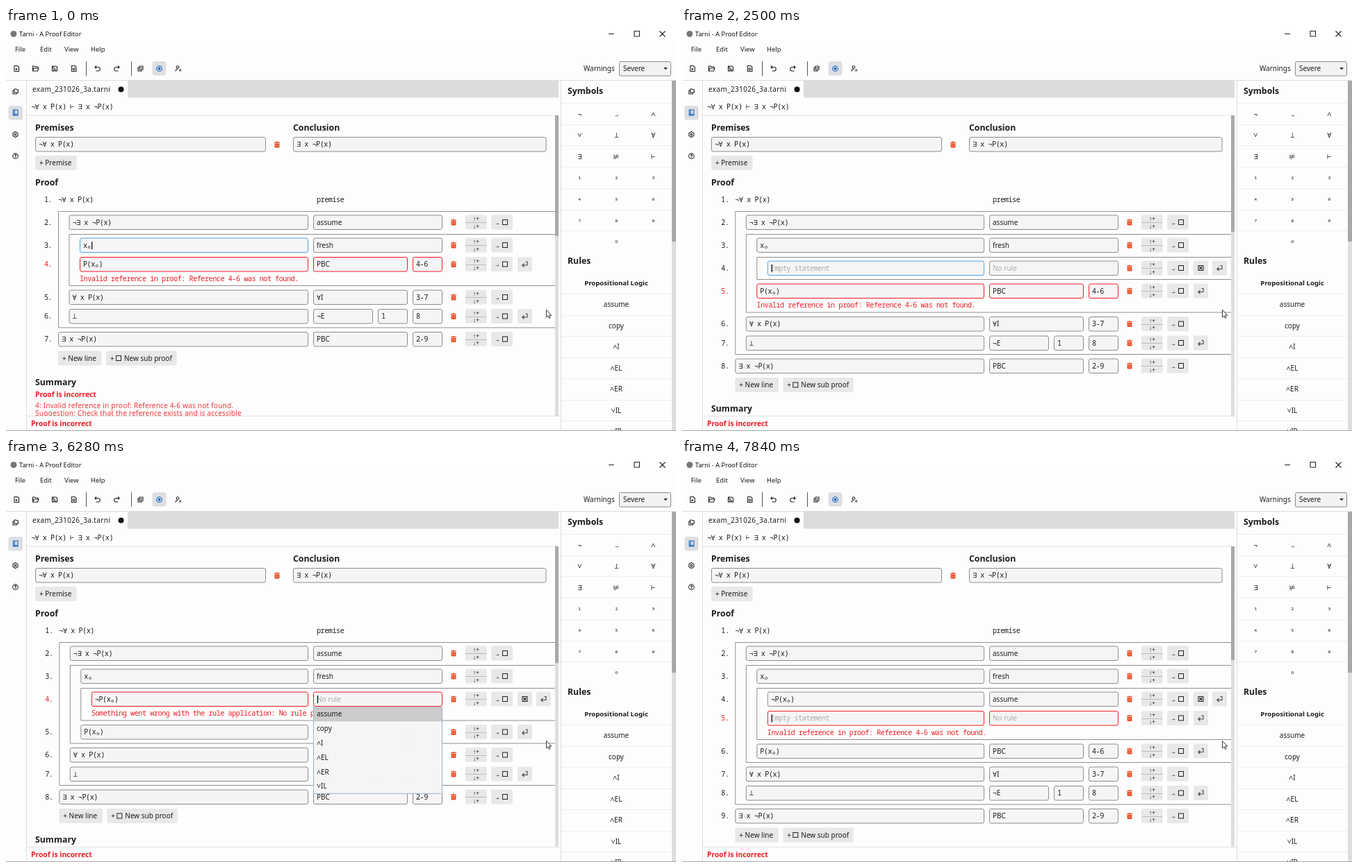
Write an HTML page that moves like this. It is 964 px wide and 581 px high and loops after 8 s.

```html
<!DOCTYPE html>
<html lang="en">
<head>
<meta charset="utf-8">
<title>Proof editor</title>
<style>
html, body { margin: 0; width: 100%; height: 100%; overflow: hidden; background: #fdfdfd; }
svg { display: block; }
text { font: 10px "Noto Sans", "Noto Sans Mono", "DejaVu Sans Mono", sans-serif; fill: #1c1c1c; white-space: pre; }
.mono { font: 10.2px "Noto Sans Mono", "DejaVu Sans Mono", monospace; letter-spacing: -.49px; }
.head { font-weight: 700; font-size: 12.3px; }
.bold { font-weight: 700; font-size: 9.6px; }
.title { font-size: 9.3px; font-family: "Open Sans", sans-serif; fill: #000; }
.menu { font-size: 9.4px; }
.tab { letter-spacing: .36px; }
.red { fill: #ee1c24; }
.soft { fill: #ee3a3a; font-size: 10.2px; letter-spacing: .14px; }
.status { fill: #ee1c24; font-weight: 700; font-size: 10.3px; }
.hint { fill: #aaa; }
.arrow { font-size: 8.5px; }
.mid { text-anchor: middle; }
.icon { fill: none; stroke: #222; stroke-width: 1.1; }
</style>
</head>
<body>
<svg id="stage" width="964" height="581" viewBox="0 0 964 581">
  <clipPath id="view"><rect x="30" y="126" width="765" height="433"/></clipPath>
  <g id="frame"></g>
  <g id="proof" clip-path="url(#view)"></g>
  <path d="M777.5 406.5v10.5l2.4-2.2 1.7 3.7 1.6-.8-1.7-3.5h3.3z" fill="#fff" stroke="#222" stroke-width=".9"/>
</svg>
<script>
const $ = id => document.getElementById(id);
const text = (x, y, s, cls = '', extra = '') =>
  `<text x="${x}" y="${y + (/head/.test(cls) ? 4.4 : 3.6)}" class="${cls}" ${extra}>${s}</text>`;
const rect = (x, y, w, h, fill, stroke = 'none', r = 0) =>
  `<rect x="${x}" y="${y}" width="${w}" height="${h}" rx="${r}" fill="${fill}" stroke="${stroke}"/>`;
const line = (d, color = '#ddd') => `<path d="${d}" fill="none" stroke="${color}"/>`;
const icon = (x, y, d, color = '#222') =>
  `<path class="icon" transform="translate(${x} ${y})" d="${d}" style="stroke:${color}"/>`;
const field = (x, y, right, color = '#8c8c8c') =>
  rect(x + .5, y - 10, right - x - 1, 20.5, '#f5f5f5', color, 2.5);
const button = (x, y, w) => rect(x, y - 10.5, w, 21, '#e8e8e8', 'none', 2);
const square = (x, y) => rect(x, y - 3.5, 7, 7, 'none', '#222');
const trash = (x, y) =>
  `<path transform="translate(${x} ${y})" fill="#e8481c" d="M-4-3.5h2.5l.6-1h1.8l.6 1H4v1.3h-8zM-3.4-1.5h6.8V3.6q0 1-1 1h-4.8q-1 0-1-1z"/>` +
  line(`M${x - 1.2} ${y}v3M${x + 1.2} ${y}v3`, '#f6a58c');
const ring = (r, x = 0, y = 0) => `M${x - r} ${y}a${r} ${r} 0 1 0 ${2 * r} 0a${r} ${r} 0 1 0 ${-2 * r} 0`;

const RULES = ['assume', 'copy', '∧I', '∧EL', '∧ER', '∨IL', '∨IR'];
const BLUE = '#1565c0', RED = '#ee1c24';

function drawFrame() {
  const page = 'M-3-4H1.500L3.500-2V4H-3z';
  let s = rect(0, 0, 964, 17, '#fff') + '<circle cx="11" cy="8.500" r="4.500" fill="#777"/>' +
    text(19, 8.5, 'Tarni - A Proof Editor', 'title') +
    icon(0, 0, 'M867 8.500h8M904 4.500h7.500v7.500H904zM940.500 4.500l8 8M948.500 4.500l-8 8');
  ['File', 'Edit', 'View', 'Help'].forEach((m, i) => s += text([13, 49, 84, 122][i], 30, m, 'menu'));

  // toolbar
  s += line('M0 75.500H964') + line('M115.500 48v21M180.500 48v21', '#555') +
    rect(210.5, 48, 20, 20.5, '#dcdfe3', 'none', 4) +
    icon(15, 58.5, page + 'M-1.500 1h3M0-.5v3') +
    icon(42.5, 58.5, 'M-4 3.500V-3.500H-1L0-2.500H3.500V-1M-4 3.500L-2.500-.5H4.500L3 3.500z') +
    icon(70, 58.5, 'M-3.500-3.500H2L3.500-2V3.500H-3.500zM-2-3v2.500h3M-1.500 1.500h3v2h-3z') +
    icon(97.5, 58.5, page + ring(1.5, .2, .8)) +
    icon(131.5, 58.5, 'M-1.500-4L-3.500-2L-1.500 0M-3.500-2H1a2.700 2.700 0 0 1 0 5.500H-2') +
    icon(159.5, 58.5, 'M1.500-4L3.500-2L1.500 0M3.500-2H-1a2.700 2.700 0 0 0 0 5.500H2') +
    icon(193.5, 58.5, 'M-1.500-3.500h5v5h-5zM-1.500-1.500h-2v5h5v-2M-.5-1h3') +
    icon(220.5, 58.5, ring(3.8) + ring(1.4) + 'M-1.500 0h3', BLUE) +
    icon(248, 58.5, ring(1.8, -1, -2) + 'M-4 4q0-3 3-3M1.500 1l2.500 3M4 1L1.500 4') +
    text(831, 58, 'Warnings') + rect(882.5, 48.5, 74, 20.5, '#f2f2f2', '#888', 2) +
    text(888, 58, 'Severe') + '<path d="M946 57h6l-3 3z" fill="#222"/>';

  // left rail and tab bar
  s += line('M29.500 76V581') + rect(3.5, 112, 20.5, 20.5, '#dcdfe3', 'none', 4) +
    icon(13.5, 91.5, 'M-1.500-3.500H1L2-2.500H4V1.500H-1.500zM-1.500-1.500H-3.500V3.500H2V1.500') +
    icon(13.5, 122, 'M-3-4H3.500V4H-3zM-1.200-4V4M-3 2.500H3.500', BLUE) +
    icon(13.5, 153.5, 'M0-4L3.500-2V2L0 4L-3.500 2V-2z' + ring(1.3)) +
    icon(13.5, 184.5, ring(3.8) + 'M-1.200-1a1.200 1.200 0 1 1 1.200 1.300V1M0 1.800v.8') +
    rect(175, 76, 620, 24.5, '#dcdcdc') + text(38, 88, 'exam_231026_3a.tarni', 'tab') +
    '<circle cx="165.500" cy="88.500" r="4" fill="#111"/>' +
    text(36, 113, '¬∀ x P(x) ⊢ ∃ x ¬P(x)', 'mono') + line('M30 126H795', '#e2e2e2') +
    line('M30 559.500H798', '#e2e2e2') + text(36, 570, 'Proof is incorrect', 'status');

  // right panel
  s += line('M798.500 76V581') + text(808, 91, 'Symbols', 'head') + text(808, 336, 'Rules', 'head');
  [...'¬→∧∨⊥∀∃⊭⊢₁₂₃₄₅₆₇₈₉ ₀'].forEach((c, i) => {
    const y = 124 + 30.7 * Math.floor(i / 3);
    s += text(825 + 53 * (i % 3), y - (/[₀-₉]/.test(c) ? 2.6 : 0), c, 'mono mid', 'font-weight="700"');
  });
  for (let i = 0; i < 7; i++) s += line(`M799 ${Math.round(108 + 30.7 * i) + .5}H958`, '#eee');
  s += text(878, 367.5, 'Propositional Logic', 'bold mid');
  RULES.forEach((r, i) => {
    const y = 398.5 + 30.5 * i;
    s += line(`M799 ${Math.round(y - 15.5) + .5}H958`, '#eee') + text(878, y, r, 'mid');
  });
  s += rect(958, 76, 6, 505, '#dedede') + rect(958, 76, 6, 232, '#a8a8a8') + line('M0 580.500H964', '#aaa');
  $('frame').innerHTML = s;
}

const BAD_REF = 'Invalid reference in proof: Reference 4-6 was not found.';
const NO_RULE = 'Something went wrong with the rule application: No rule provided.';
const before = [[0, '¬∀ x P(x)', 'premise'], [1, '¬∃ x ¬P(x)', 'assume'], [2, 'x₀', 'fresh']];
const after = [[2, 'P(x₀)', 'PBC', '4-6'], [1, '∀ x P(x)', '∀I', '3-7'],
  [1, '⊥', '¬E', '1', '8'], [0, '∃ x ¬P(x)', 'PBC', '2-9']];

// Each step changes part of the state. added: new rows, depth: their depth,
// err: row of the message, row and col: focused field, drop: open suggestions
const steps = [
  [0, { added: 0, depth: 2, dx: 0, formula: '', rule: '', err: 3, msg: BAD_REF, row: 2, col: 0, caret: 1, invalid: 0, drop: 0 }],
  [470, { caret: 0 }], [960, { caret: 1 }], [1450, { caret: 0 }], [1930, { caret: 1 }],
  [2040, { added: 1, row: 3 }], [2260, { err: 4 }], [2500, { depth: 3, dx: 1.3 }],
  [2990, { caret: 0 }], [3480, { caret: 1 }],
  [3740, { formula: '¬', invalid: 1 }],
  [4110, { formula: '¬P', invalid: 0, err: 3, msg: NO_RULE }],
  [4480, { formula: '¬P(' }], [4720, { formula: '¬P(x' }], [5070, { formula: '¬P(x_' }],
  [5310, { formula: '¬P(x₀' }], [5680, { formula: '¬P(x₀)' }],
  [6280, { col: 1, drop: 6 }], [6520, { rule: 'a', drop: 1 }], [6640, { rule: 'as' }],
  [6760, { rule: 'ass' }], [6880, { rule: 'assum' }], [7000, { rule: 'assume' }],
  [7370, { drop: 0 }], [7740, { err: 4, msg: BAD_REF }], [7840, { added: 2, row: 4, col: 0 }]
];

function drawProof(st) {
  const fresh = [[st.depth, st.formula, st.rule], [st.depth, '', '']].slice(0, st.added);
  const rows = [...before, ...fresh, ...after];
  const left = d => 75 + st.dx + 15.5 * d;
  const open = [];
  let s = text(42, 144, 'Premises', 'head') + text(413, 144, 'Conclusion', 'head') +
    field(42, 167.5, 374) + text(47, 167.5, '¬∀ x P(x)', 'mono') + trash(390, 168) +
    field(413, 167.5, 777.5) + text(418, 167.5, '∃ x ¬P(x)', 'mono') +
    button(42, 194.5, 59.5) + text(48, 194.5, '+ Premise') + text(42, 223, 'Proof', 'head');
  let y = 247, overlay = '', caretAt;

  rows.forEach(([depth, formula, rule, ...refs], i) => {
    const next = rows[i + 1] ? rows[i + 1][0] : 0;
    const starts = i > 0 && depth > rows[i - 1][0];
    const bad = i === st.err, x = left(depth);
    if (starts) open.push(y - 15.5);
    s += text(55 + st.dx, y, i + 1 + '.', bad ? 'mono red' : 'mono');

    if (!i) s += text(x, y, formula, 'mono') + text(447, y, rule, 'mono');
    else {
      const color = col => bad || (st.invalid && i === st.row && !col) ? RED
        : i === st.row && st.col === col ? '#4aa3e8' : undefined;
      const live = col => {
        if (i !== st.row || st.col !== col) return '';
        caretAt = { x: (col ? 442 : x) + 5, y, empty: !(col ? rule : formula) };
        return 'id="live"';
      };
      const ruleEnd = [628, 578, 528][refs.length];
      s += field(x, y, 435, color(0)) + text(x + 5, y, formula || 'Empty statement', formula ? 'mono' : 'mono hint', live(0)) +
        field(442, y, ruleEnd, color(1)) + text(447, y, rule || 'No rule', rule ? '' : 'hint', live(1));
      refs.forEach((r, k) => {
        const rx = ruleEnd + 7 + 50 * k;
        s += field(rx, y, rx + 43, color(2)) + text(rx + 5, y, r, 'mono');
      });
      s += trash(644, y) + button(661, y, 30.5) + line(`M661 ${Math.round(y) + .5}h30.500`, '#bbb') +
        text(676, y - 5.5, '↑+', 'mono arrow mid') + text(676, y + 5, '↓+', 'mono arrow mid') +
        button(698, y, 31) + text(703.5, y, '→', 'mono') + square(714.5, y);
      let bx = 736;
      if (starts && depth === 3) {
        s += button(bx, y, 21) + square(bx + 7, y) + icon(bx + 10.5, y, 'M-2-2L2 2M2-2L-2 2');
        bx += 27;
      }
      if (next < depth || bx > 736)
        s += button(bx, y, 21) + icon(bx + 10.5, y, 'M1-3.500H3.500V1.500H-3.500L-1-1M-3.500 1.500L-1 4', '#444');
      if (bad) s += text(x, y + 20.5, st.msg, 'mono red');
      if (i === st.row && st.drop) {
        for (let k = 0; k < st.drop; k++)
          overlay += rect(442.5, y + 12 + 20.8 * k, 185, 20.5, k ? '#f5f5f5' : '#cbcbcb') +
            text(447, y + 21.7 + 20.8 * k, RULES[k]);
        overlay += rect(442.5, y + 12, 185, 20.8 * st.drop - .5, 'none', '#9fb4c8');
      }
    }
    const bottom = y + (bad ? 14.5 : 0);
    if (next < depth) s += line(`M792 ${open.pop()}H${left(depth - 1) + .5}V${bottom + 16.5}H792`, '#8f8f8f');
    if (i < rows.length - 1) y = bottom + 27.5 + (next !== depth ? 5.5 : 0);
  });

  const end = y + 27.5, bx = left(0);
  s += button(bx, end, 62.5) + text(bx + 6, end, '+ New line') +
    button(bx + 69, end, 101.5) + text(bx + 75, end, '+') + square(bx + 83.5, end) + text(bx + 95, end, 'New sub proof') +
    text(42, end + 34.5, 'Summary', 'head') + text(42, end + 52, 'Proof is incorrect', 'status') +
    text(42, end + 68.5, '4: ' + BAD_REF, 'soft') +
    text(42, end + 79.5, 'Suggestion: Check that the reference exists and is accessible', 'soft') +
    rect(790, 126, 5, 433, '#dedede') + rect(790, 126, 5, 433 ** 2 / (1077 + y - 448.5), '#a8a8a8');
  $('proof').innerHTML = s + overlay;

  if (st.caret) {
    const x = caretAt.x + .8 + (caretAt.empty ? 0 : $('live').getComputedTextLength());
    $('proof').insertAdjacentHTML('beforeend', rect(x, caretAt.y - 5, 1.3, 11, '#111'));
  }
}

let shown = -1;
function tick(now) {
  const t = now % 8000;
  const count = steps.filter(([at]) => at <= t).length;
  if (count !== shown) {
    shown = count;
    drawProof(Object.assign({}, ...steps.slice(0, count).map(step => step[1])));
  }
  requestAnimationFrame(tick);
}
drawFrame();
const start = performance.now();
tick(0);
requestAnimationFrame(function loop() {
  tick.now = performance.now() - start;
});
</script>
</body>
</html>
```
